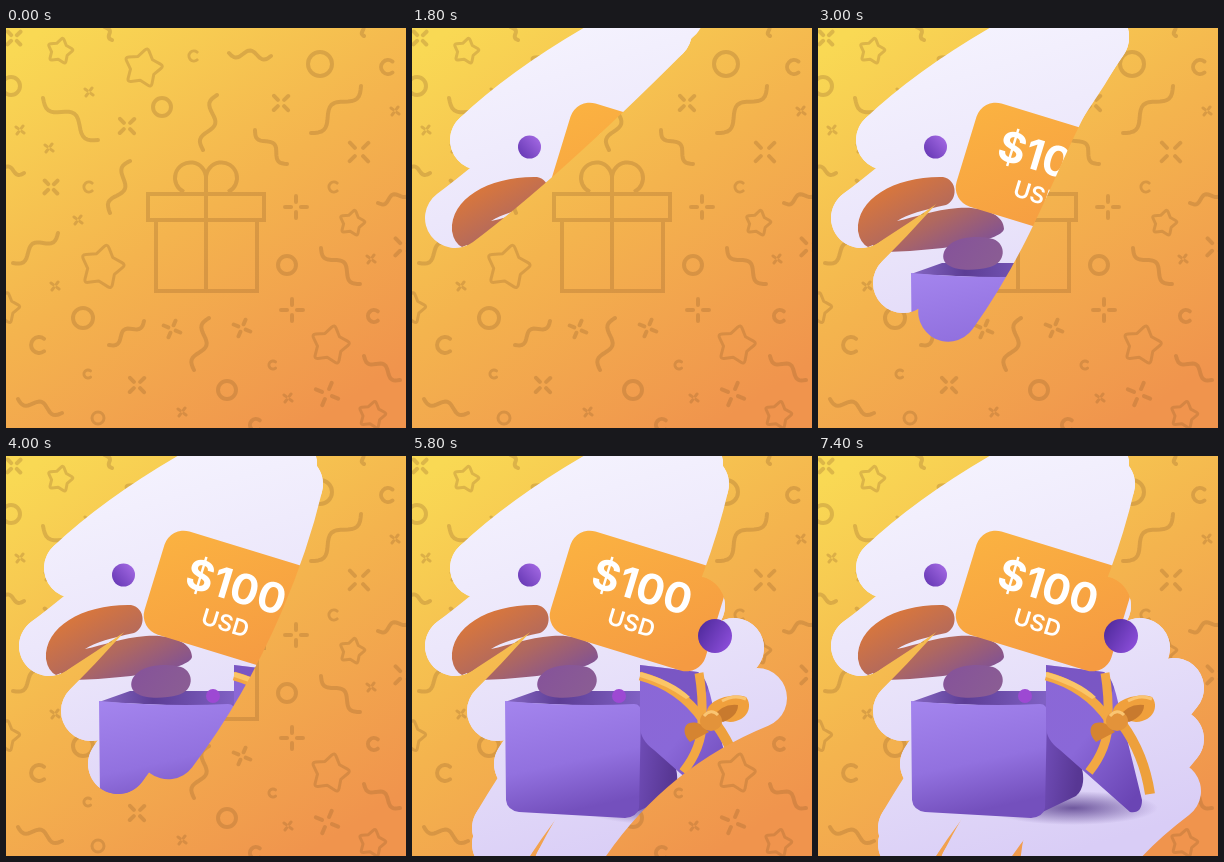
Recreate the animation shown at these times as an HTML page. Size 400 px wide and 400 px high, loop 7500 ms.

```html
<!DOCTYPE html>
<html lang="en">
<head>
<meta charset="utf-8">
<title>Scratch card</title>
<style>
  html, body { margin: 0; width: 100%; height: 100%; overflow: hidden; }
  svg { display: block; width: 100vw; height: 100vh; }
  text { font-family: Inter, Roboto, sans-serif; fill: #fff; text-anchor: middle; }
</style>
</head>
<body>
<svg viewBox="0 0 400 400">
  <defs>
    <linearGradient id="coat" x1="0.1" y1="0" x2="0.75" y2="1">
      <stop offset="0" stop-color="#f9d954"/><stop offset="0.5" stop-color="#f4b44e"/><stop offset="1" stop-color="#f0944d"/>
    </linearGradient>
    <linearGradient id="paper" x1="0.3" y1="0" x2="0.6" y2="1">
      <stop offset="0" stop-color="#f5f3fe"/><stop offset="0.5" stop-color="#e9e3fa"/><stop offset="1" stop-color="#d9cdf6"/>
    </linearGradient>
    <linearGradient id="card" x1="0" y1="0" x2="1" y2="0.8">
      <stop offset="0" stop-color="#fbb341"/><stop offset="1" stop-color="#f59a42"/>
    </linearGradient>
    <linearGradient id="swirl" gradientUnits="userSpaceOnUse" x1="85" y1="150" x2="135" y2="242">
      <stop offset="0" stop-color="#d9773c"/><stop offset="0.5" stop-color="#b0685f"/><stop offset="1" stop-color="#7b4f9b"/>
    </linearGradient>
    <linearGradient id="curl" x1="0" y1="0" x2="1" y2="0.4">
      <stop offset="0" stop-color="#85529a"/><stop offset="1" stop-color="#8a5c94"/>
    </linearGradient>
    <linearGradient id="front" x1="0" y1="0" x2="0.25" y2="1">
      <stop offset="0" stop-color="#a485ee"/><stop offset="0.6" stop-color="#9271df"/><stop offset="1" stop-color="#7450bd"/>
    </linearGradient>
    <linearGradient id="side" x1="0" y1="0" x2="1" y2="0.3">
      <stop offset="0" stop-color="#7c58c9"/><stop offset="1" stop-color="#583794"/>
    </linearGradient>
    <linearGradient id="inside" x1="0" y1="0" x2="1" y2="0">
      <stop offset="0" stop-color="#8768c4"/><stop offset="0.4" stop-color="#5c3d95"/><stop offset="1" stop-color="#8061c4"/>
    </linearGradient>
    <linearGradient id="lid" x1="0" y1="0" x2="0.8" y2="1">
      <stop offset="0" stop-color="#8b67d6"/><stop offset="0.5" stop-color="#8a68d8"/><stop offset="1" stop-color="#6a45b4"/>
    </linearGradient>
    <linearGradient id="ball" x1="0.1" y1="0.8" x2="0.9" y2="0.1">
      <stop offset="0" stop-color="#6b3cb8"/><stop offset="1" stop-color="#a268e2"/>
    </linearGradient>
    <linearGradient id="darkBall" x1="0" y1="0.2" x2="1" y2="0.8">
      <stop offset="0" stop-color="#4f2a9c"/><stop offset="1" stop-color="#8e4fdc"/>
    </linearGradient>
    <radialGradient id="shade">
      <stop offset="0" stop-color="#4a2f80" stop-opacity="0.75"/><stop offset="1" stop-color="#4a2f80" stop-opacity="0"/>
    </radialGradient>
    <mask id="scratched" maskUnits="userSpaceOnUse" x="0" y="0" width="400" height="400">
      <g id="strokes" fill="none" stroke="#fff" stroke-width="60" stroke-linecap="round"/>
    </mask>
  </defs>

  <rect width="400" height="400" fill="url(#coat)"/>
  <g opacity="0.27" fill="none" stroke="#92602c" stroke-width="4" stroke-linecap="round" stroke-linejoin="round">
    <path id="thin" stroke-width="3"/>
    <path id="thick"/>
    <path stroke-linecap="butt" stroke-linejoin="miter" d="M142 166H258V192H142ZM150 192V263H251V192M200 166V263M200 166V150A15.500 15.500 0 1 0 178 164M200 150A15.500 15.500 0 1 1 222 164"/>
  </g>

  <g mask="url(#scratched)">
    <rect width="400" height="400" fill="url(#paper)"/>
    <ellipse cx="255" cy="352" rx="85" ry="17" fill="url(#shade)"/>
    <path fill="url(#swirl)" d="M40 203C38 170 78 148 125 149C140 152 140 172 128 177C105 182 90 186 79 193C98 189 115 182 140 180C166 178 186 187 186 201C184 213 120 224 57 224L55 217L50 219Q42 215 40 203Z"/>

    <path fill="url(#inside)" d="M93 246L124 235H228V252Z"/>
    <path fill="url(#side)" d="M226 248L262 305Q270 330 258 340L212 362Z"/>
    <path fill="url(#front)" d="M93 245Q160 251 222 248Q229 248 229 256L227 352Q225 361 213 362L107 356Q95 354 94 344Z"/>
    <path fill="url(#curl)" d="M126 224C120 242 150 245 172 239C188 235 189 216 175 211C160 207 133 208 126 224Z"/>

    <path fill="url(#lid)" d="M228 209L286 216Q294 222 298 238L324 344Q324 358 312 356L242 294Q228 284 228 270Z"/>
    <path fill="#6d49b5" opacity="0.55" d="M228 209L286 216Q294 222 296 232L286 256Q265 230 228 218Z"/>
    <g fill="none" stroke="#f3a843" stroke-width="9">
      <path d="M228 220Q268 231 291 264"/>
      <path d="M287 217Q291 240 290 266Q290 292 271 316"/>
      <path d="M304 268Q326 298 332 338" stroke="#eda03c" stroke-width="10"/>
    </g>
    <path fill="#fbc567" d="M228 216Q260 224 278 241L274 243Q255 229 228 221Z"/>
    <path fill="#f0a03c" d="M295 262C290 245 318 236 334 241C341 250 336 265 318 266Z"/>
    <path fill="#d58431" d="M288 268C272 262 268 276 278 286L297 276Z"/>
    <path fill="#c87a2e" d="M300 262Q310 247 326 249Q326 260 311 266Z"/>
    <ellipse cx="299" cy="265" rx="11" ry="10" fill="#e3933a"/>
    <path fill="none" stroke="#fac572" stroke-width="3" d="M292 260Q299 252 306 259M310 245Q322 238 334 243"/>

    <g transform="translate(226 145) rotate(17)">
      <rect x="-81" y="-54" width="162" height="108" rx="20" fill="url(#card)"/>
      <text y="0" font-size="42" font-weight="700">$100</text>
      <text y="31" font-size="23" font-weight="600">USD</text>
    </g>
    <circle cx="117.500" cy="119" r="11.500" fill="url(#ball)"/>
    <circle cx="303" cy="180" r="17" fill="url(#darkBall)"/>
    <circle cx="207" cy="240" r="7" fill="#9d49d3"/>
  </g>
</svg>
<script>
const LOOP = 7500, STEP = 100;
const byId = id => document.getElementById(id);
const polar = (x, y, r, a) => `${(x + r * Math.cos(a)).toFixed(1)} ${(y + r * Math.sin(a)).toFixed(1)}`;

// Confetti shapes
const ring = ([x, y, r]) => `M${x - r} ${y}a${r} ${r} 0 1 0 ${2 * r} 0a${r} ${r} 0 1 0 ${-2 * r} 0`;
const hook = ([x, y, r]) => `M${polar(x, y, r, 0.9)}A${r} ${r} 0 1 1 ${polar(x, y, r, -0.9)}`;
const spark = turn => ([x, y, r]) => [0, 1, 2, 3].map(i => {
  const a = turn + i * Math.PI / 2;
  return `M${polar(x, y, r * 0.45, a)}L${polar(x, y, r, a)}`;
}).join('');
function star([x, y, r]) {
  const at = i => polar(x, y, i % 2 ? r * 0.6 : r, i * Math.PI / 5 - 1.35);
  let d = '';
  for (let i = 0; i < 10; i += 2) {
    // rounded tips: stop short of each point and curve through it
    const mix = (p, q, k) => {
      const [a, b] = p.split(' ').map(Number), [c, e] = q.split(' ').map(Number);
      return `${a + (c - a) * k} ${b + (e - b) * k}`;
    };
    const tip = at(i);
    d += `${i ? 'L' : 'M'}${mix(tip, at(i + 9), 0.3)}Q${tip} ${mix(tip, at(i + 1), 0.3)}L${at(i + 1)}`;
  }
  return d + 'Z';
}
function squiggle([x1, y1, x2, y2]) {
  const dx = x2 - x1, dy = y2 - y1, len = Math.hypot(dx, dy), n = 24;
  let d = '';
  for (let i = 0; i <= n; i++) {
    const k = i / n, w = Math.sin(k * Math.PI * 3) * len * 0.095;
    d += `${i ? 'L' : 'M'}${(x1 + dx * k - dy / len * w).toFixed(1)} ${(y1 + dy * k + dx / len * w).toFixed(1)}`;
  }
  return d;
}
const draw = (shape, items) => items.map(shape).join('');

byId('thin').setAttribute('d',
  draw(star, [[54, 23, 14], [137, 40, 21], [346, 195, 14], [96, 239, 24], [324, 317, 21], [366, 387, 15], [-2, 280, 17]]) +
  draw(hook, [[188, 28, 5], [83, 159, 5], [328, 159, 5], [267, 337, 4], [82, 346, 4]]) +
  draw(ring, [[92, 390, 6]]) +
  draw(spark(0.65), [[14, 102, 5], [43, 120, 5], [83, 64, 5], [389, 83, 5], [72, 192, 5], [49, 258, 5],
    [365, 231, 5], [176, 384, 5], [282, 370, 5]]));

byId('thick').setAttribute('d',
  draw(ring, [[5, 58, 9], [156, 79, 9], [314, 36, 12], [281, 237, 9], [77, 290, 10], [221, 362, 9]]) +
  draw(hook, [[382, 39, 7], [33, 317, 8], [368, 288, 6], [250, 397, 6]]) +
  draw(spark(0.8), [[121, 98, 10], [275, 75, 10], [353, 124, 13], [45, 159, 9], [131, 357, 10], [8, 10, 9], [398, 219, 12]]) +
  draw(spark(0.4), [[166, 301, 9], [236, 300, 9], [321, 366, 12]]) +
  draw(spark(0), [[290, 179, 11], [286, 282, 11]]) +
  draw(squiggle, [[37, 70, 92, 112], [305, 105, 355, 58], [223, 25, 265, 28], [211, 67, 197, 122],
    [249, 102, 281, 136], [124, 133, 104, 185], [7, 235, 52, 205], [315, 220, 354, 256], [103, 317, 138, 293],
    [203, 290, 188, 342], [358, 328, 394, 352], [12, 371, 56, 385], [372, 175, 404, 164], [-14, 138, 18, 145],
    [98, -6, 106, 12], [354, -8, 358, 8]]));

// Scratch passes: curve control, end point, finish time
const passes = [
  ['Q138 46', 68, 112, 1300],
  ['Q160 60', 250, 4, 1520],
  ['Q128 126', 43, 190, 1800],
  ['Q170 110', 281, 8, 2100],
  ['Q205 140', 85, 255, 2400],
  ['Q190 150', 281, 10, 2690],
  ['C215 90 205 190', 112, 308, 3030],
  ['Q215 150', 287, 28, 3420],
  ['C270 100 215 260', 90, 372, 4210],
  ['Q180 220', 283, 150, 4500],
  ['Q190 217', 90, 388, 4800],
  ['Q185 240', 322, 192, 5100],
  ['Q225 270', 152, 410, 5450],
  ['Q222 292', 345, 242, 5800],
  ['Q235 330', 232, 412, 6100],
  ['Q280 320', 356, 232, 6400],
  ['Q300 300', 262, 420, 6650],
  ['Q300 340', 356, 283, 6900],
  ['Q300 350', 275, 415, 7150],
  ['Q300 375', 353, 335, 7400]
];
let x = 262, y = -14, start = 1040;
const strokes = passes.map(([curve, endX, endY, end]) => {
  const path = document.createElementNS('http://www.w3.org/2000/svg', 'path');
  path.setAttribute('d', `M${x} ${y}${curve} ${endX} ${endY}`);
  path.setAttribute('pathLength', 1);
  byId('strokes').append(path);
  const stroke = { path, start, end };
  [x, y, start] = [endX, endY, end];
  return stroke;
});

function render(time) {
  const t = Math.floor(time % LOOP / STEP) * STEP;
  for (const { path, start, end } of strokes) {
    const p = Math.min(1, (t - start) / (end - start));
    path.setAttribute('visibility', p > 0 ? 'visible' : 'hidden');
    path.setAttribute('stroke-dasharray', `${Math.max(0, p)} 2`);
  }
}

const began = performance.now();
(function tick() {
  render(performance.now() - began);
  requestAnimationFrame(tick);
})();
</script>
</body>
</html>
```
